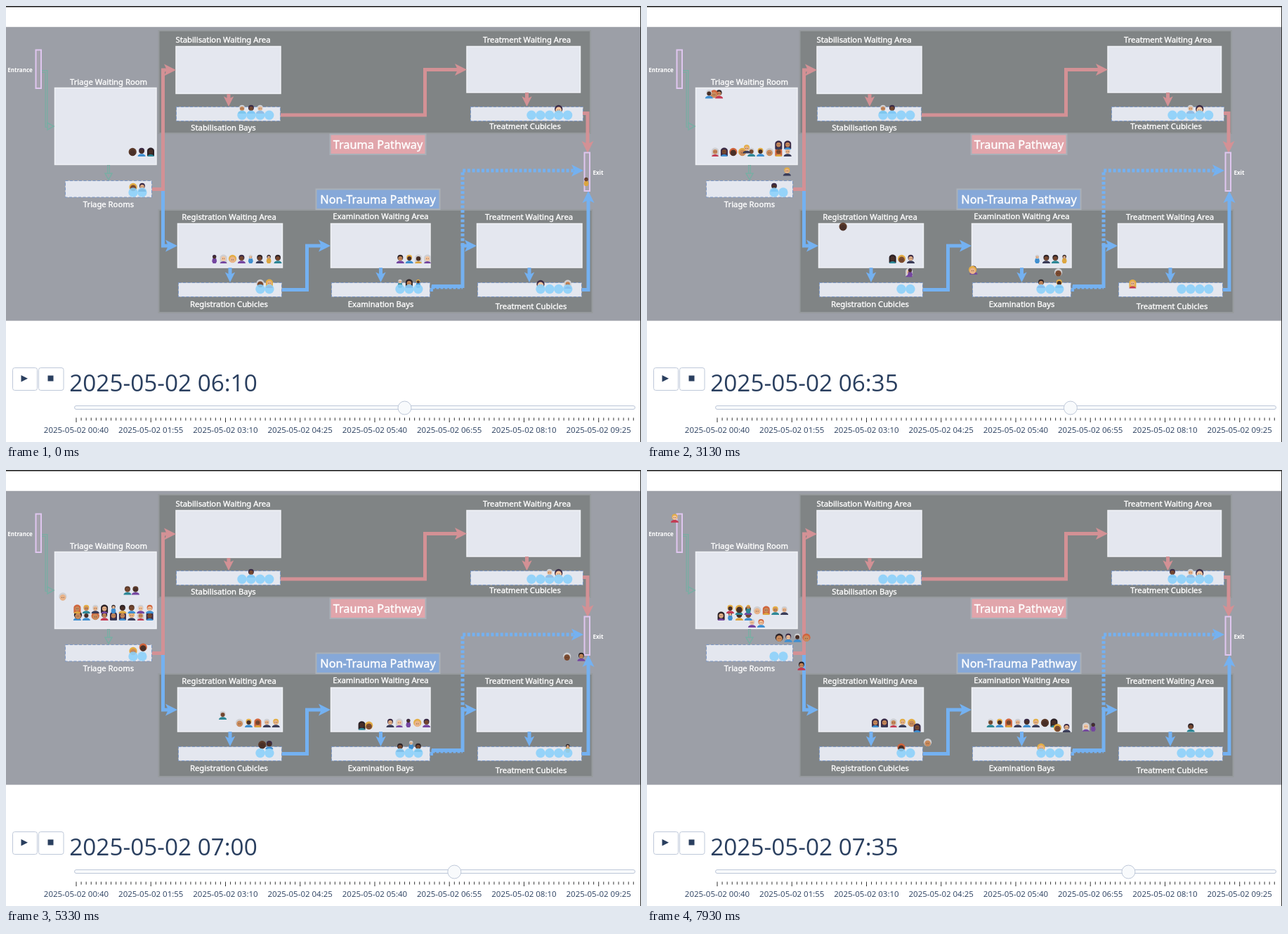
Recreate the animation shown at these times as an HTML page. Size 904 by 620 pixels, loop 8 s.

```html
<!DOCTYPE html>
<html lang="en">
<head>
<meta charset="utf-8">
<title>Patient pathway simulation</title>
<style>
  html, body { margin: 0; width: 100%; height: 100%; overflow: hidden; background: #fff; }
  svg { display: block; width: 904px; height: 620px; }
  .label { font: 11.25px "Noto Sans", sans-serif; fill: #fff; stroke: #fff; stroke-width: .35; text-anchor: middle; }
  .pathway { font-size: 16.3px; }
  .door { font-size: 8px; font-weight: 700; stroke: none; }
  .clock { font: 33.3px "Open Sans", "Noto Sans", sans-serif; fill: #2a3f5f; }
  .tick { font: 11.5px "Open Sans", "Noto Sans", sans-serif; fill: #2a3f5f; text-anchor: middle; }
</style>
</head>
<body>
<svg id="stage" viewBox="0 0 904 620">
  <g id="scene"></g>
  <g id="people"></g>
  <g id="resources"></g>
  <g id="controls"></g>
  <g id="toolbar" opacity="0">
    <rect x="787" y="29" width="115" height="24" fill="#fff" opacity=".5"/>
    <path d="M799 33h3l2-3h4l2 3h4v11h-15z" fill="#8f9297"/>
    <circle cx="806" cy="38.500" r="3.200" fill="#c9cbcf"/>
    <circle cx="806" cy="38.500" r="1.600" fill="#8f9297"/>
    <rect x="830" y="31" width="13" height="13" fill="none" stroke="#8f9297" stroke-width="2" stroke-dasharray="2 1.700"/>
    <path d="M856 41c-6-3-3-10 4-10s8 6 3 8-6-1-7 1 2 2 0 4" fill="none" stroke="#8f9297" stroke-width="1.500"/>
    <rect x="883" y="30" width="15" height="15" rx="2" fill="#111"/>
  </g>
</svg>
<script>
const LOOP = 8000, FRAME = 1000 / 15;
const PLAY_AT = 1258, STEP = 412, KNOB_MOVE = 150;
const GAP = 12.9, ROW = 10;
const RED = '#d39195', BLUE = '#74b1f1', GREEN = '#78aea4', GREY = '#9c9fa7', INK = '#2a3f5f';
const $ = id => document.getElementById(id);

// ---- drawing helpers ----
const rect = (x1, y1, x2, y2, attrs) =>
  `<rect x="${x1}" y="${y1}" width="${x2 - x1}" height="${y2 - y1}" ${attrs}/>`;
const panel = (...box) => rect(...box, 'fill="#808485" stroke="#969a9d" stroke-width="2"');
const room = (...box) => rect(...box, 'fill="#e4e7ef" stroke="#eff1f5" stroke-width="1.5"');
const bay = (...box) => rect(...box, 'fill="#e4e7ef" stroke="#7c98c6" stroke-dasharray="4 2.500"');
const door = (...box) => rect(...box, 'fill="#a6a3ae" stroke="#dfc6ef" stroke-width="2"');
const sign = (fill, ...box) => rect(...box, `fill="${fill}" stroke="#a9b0b8" stroke-width="2"`);
const label = (text, x, y, kind = '') => `<text class="label ${kind}" x="${x}" y="${y}">${text}</text>`;

function arrow(color, points, { dash = '', size = 1, hollow = false } = {}) {
  const [[px, py], [x, y]] = points.slice(-2);
  const angle = Math.atan2(y - py, x - px);
  const reach = (hollow ? 10 : 12) * size;
  const end = [x - reach * Math.cos(angle), y - reach * Math.sin(angle)];
  const line = (stroke, width) => `<polyline points="${[...points.slice(0, -1), end].join(' ')}" fill="none"
    stroke="${stroke}" stroke-width="${width}" stroke-dasharray="${dash}"/>`;
  const at = `transform="translate(${x} ${y}) rotate(${angle * 180 / Math.PI}) scale(${size})"`;
  return hollow
    ? line(color, 4) + line(GREY, 1.4) +
      `<path d="M-1 0L-10 5V-5z" ${at} fill="${GREY}" stroke="${color}" stroke-width="1.5"/>`
    : line(color, 5) + `<path d="M0 0L-17 8.500L-13 0L-17-8.500z" ${at} fill="${color}"/>`;
}
const down = (color, x, y1, y2) => arrow(color, [[x, y1], [x, y2]], { size: .85 });

$('scene').innerHTML = [
  rect(0, 0, 904, 620, 'fill="#fff"'),
  rect(0, 29.8, 903, 447.6, `fill="${GREY}"`),
  panel(217.5, 35, 832, 181), panel(217.5, 290, 834.5, 436),
  room(69.5, 116.5, 214, 225.5), room(242, 57.5, 391, 124.5), room(656, 57.5, 817.5, 123),
  room(244.5, 309.5, 393.5, 372), room(462.5, 309.5, 604, 372), room(670.5, 309.5, 820, 372),
  bay(84.5, 248.5, 207.5, 272), bay(242.5, 143.5, 390.5, 163.5), bay(661.5, 143.5, 821.5, 163.5),
  bay(245.5, 393.5, 392.5, 413.5), bay(463.5, 393.5, 603.5, 413.5), bay(671.5, 393.5, 819.5, 413.5),
  arrow(GREEN, [[50, 93], [57.5, 93], [57.5, 171], [69, 171]], { hollow: true }),
  arrow(GREEN, [[146, 226], [146, 248]], { hollow: true }),
  arrow(BLUE, [[223.5, 262], [223.5, 341], [244, 341]]),
  arrow(RED, [[208, 260.5], [223.5, 260.5], [223.5, 91], [242, 91]]),
  arrow(RED, [[391, 155], [596.5, 155], [596.5, 90.5], [656, 90.5]]),
  arrow(RED, [[821, 152.5], [828, 152.5], [828, 209]]),
  down(RED, 317, 125, 143), down(RED, 741.5, 123, 143),
  arrow(BLUE, [[393, 403.5], [428.5, 403.5], [428.5, 341], [462, 341]]),
  arrow(BLUE, [[650, 341], [650, 234], [822, 234]], { dash: '4 2.700' }),
  `<path d="M604 403.500H608V400H650" fill="none" stroke="${BLUE}" stroke-width="5" stroke-dasharray="4 2"/>`,
  arrow(BLUE, [[606, 398.5], [650, 398.5], [650, 341], [670, 341]]),
  arrow(BLUE, [[820, 403.5], [829, 403.5], [829, 263]]),
  down(BLUE, 319, 372, 393), down(BLUE, 533.5, 372, 393), down(BLUE, 745, 372, 393),
  door(42.5, 62.5, 50, 117), door(823.5, 208.5, 831, 263),
  sign('#e1a5ab', 461.5, 182.5, 597.5, 211), sign('#86a8d8', 441.5, 260.5, 617.5, 289),
  label('Trauma Pathway', 529.5, 203, 'pathway'), label('Non-Trauma Pathway', 529.5, 281, 'pathway'),
  label('Entrance', 20, 94, 'door'), label('Exit', 843, 239.5, 'door'),
  label('Triage Waiting Room', 146, 112), label('Triage Rooms', 146, 286),
  label('Stabilisation Waiting Area', 309, 52), label('Stabilisation Bays', 309.5, 177),
  label('Treatment Waiting Area', 741.5, 52), label('Treatment Cubicles', 739, 175),
  label('Registration Waiting Area', 317.5, 303.5), label('Registration Cubicles', 317.5, 428),
  label('Examination Waiting Area', 533.5, 303), label('Examination Bays', 533.5, 428),
  label('Treatment Waiting Area', 744.5, 303.5), label('Treatment Cubicles', 747.5, 430.5),
].join('');

// ---- places: queues fill leftwards in rows of ten, bays have numbered slots ----
const ENTRANCE = [7, 36], EXIT = [826, 250];
const QUEUES = { W: [206, 208], R: [387, 360], E: [600, 360] };
const BAYS = {
  T: { x: 181, y: 258, count: 2, circle: 265 },
  s: { x: 336, y: 147, count: 4, circle: 155.3 },
  u: { x: 748, y: 147, count: 5, circle: 155.3 },
  r: { x: 362, y: 395, count: 2, circle: 402.5 },
  e: { x: 561, y: 395, count: 3, circle: 402.5 },
  N: { x: 761, y: 396, count: 4, circle: 402.5 },
};

function position(key, index) {
  if (key === 'X') return EXIT;
  const queue = QUEUES[key];
  if (queue) return [queue[0] - GAP * (index % 10), queue[1] - ROW * Math.floor(index / 10)];
  const spot = BAYS[key[0]];
  return [spot.x + GAP * key[1], spot.y];
}

$('resources').innerHTML = Object.values(BAYS).flatMap(b => Array.from({ length: b.count }, (_, i) =>
  `<circle cx="${b.x + GAP * i}" cy="${b.circle}" r="6.700" fill="#8ad0fb" opacity=".88"/>`)).join('');

// Moves per five minutes. A: arrival, X: exit, *n repeats.
const SCHEDULE = [
  'A>W*3 A>T0 A>T1 A>s0 A>s1 A>s2 A>u3 A>R*8 A>r0 A>r1 A>E*4 A>e0 A>e1 A>e2 A>N0 A>N3 A>X',
  's2>u2 N0>X e2>X E>e2 r1>E r0>E R>r1 R>r0 A>W*5',
  'e0>X E>e0 r0>E R>r0 T1>R W>T1 A>W*3',
  'N3>X e2>X E>e2 r1>E R>r1 T0>R W>T0 A>W*2',
  'e0>X e1>X E>e0 E>e1 r0>E r1>E R>r0 R>r1 T1>R W>T1 A>W*3',
  'e1>N2 E>e1 r0>E r1>E R>r0 R>r1 T1>R W>T1 A>W*3',
  'e0>N0 E>e0 r1>E R>r1 T0>R W>T0 A>W*3',
  'N2>X e2>X E>e2 r0>E R>r0 T1>R W>T1 s0>u1 A>W*3',
  'r1>E R>r1 T0>R W>T0 A>W*4',
  'u1>X e0>N3 E>e0 T1>R W>R T0>R W>T1 W>T0 A>W',
  'N0>X e1>X E>e1 r0>E r1>E R>r0 R>r1 T1>R W>T1 A>W*3',
  'N3>X r0>E R>r0 A>W*2',
  'e0>N1 e1>N3 E>e1 E>e0 r0>E r1>E R>r0 R>r1 T1>R W>R T0>R W>T1 W>T0',
  'r0>E R>r0 T0>R W>T0',
  'N3>X e1>X e2>N0 E>e2 E>e1 r1>E R>r1 T1>R W>T1 A>W',
  'N1>X r0>E R>r0 T1>R W>T1 s1>u0',
  'r0>E R>r0 T0>R',
  'N0>X e1>X e2>X E>e2 E>e1 r1>E R>r1 T1>R W>R*4 W>T1 W>T0 A>W',
];

let population = 0;
const places = {};
const snapshots = SCHEDULE.map(moves => {
  places.X = [];
  for (const move of moves.split(' ')) {
    const [, from, to, times = 1] = move.match(/(\w+)>(\w+)\*?(\d+)?/);
    for (let i = 0; i < times; i++) {
      const id = from === 'A' ? population++ : places[from].shift();
      (places[to] ??= []).push(id);
    }
  }
  const spots = {};
  for (const key in places) places[key].forEach((id, i) => { spots[id] = position(key, i); });
  return spots;
});

// ---- people ----
const SKIN = ['#f5c59d', '#c98a5b', '#7a4a30', '#e9b48a', '#4a3028'];
const HAIR = ['#2c2226', '#5b3a2a', '#e3ad45', '#cfcfd2', '#3a2a45', '#d0643c'];
const CLOTHES = ['#3a3c58', '#3f8fd0', '#7446a0', '#2d8796', '#c43a52', '#dca640'];

function person(id) {
  const pick = (list, salt) => {
    const n = Math.sin((id + 1) * salt) * 4375.85;
    return list[Math.floor((n - Math.floor(n)) * list.length)];
  };
  const skin = pick(SKIN, 12.98), hair = pick(HAIR, 78.23), clothes = pick(CLOTHES, 37.71);
  const face = (cy, r) => `<circle cy="${cy}" r="${r}" fill="${skin}"/>
    <path d="M-1.600 ${cy}h.8M.8 ${cy}h.8" stroke="#33262a" stroke-width=".9"/>`;
  const kind = pick(['bust', 'head', 'bust', 'long', 'figure'], 51.37);
  const body = {
    head: `<circle cy="-.6" r="5.600" fill="${hair}"/>${face(.9, 4.3)}`,
    bust: `<path d="M-5.500 6C-5.500 1 5.500 1 5.500 6z" fill="${clothes}"/>
      <circle cy="-2.200" r="4" fill="${hair}"/>${face(-1, 3)}`,
    long: `<path d="M-5 5V-2C-5-8 5-8 5-2V5z" fill="${hair}"/>
      <path d="M-5 6C-4 2 4 2 5 6z" fill="${clothes}"/>${face(-.8, 3.2)}`,
    figure: `<path d="M-2.500-1h5l1 4-1.500 3h-4l-1.500-3z" fill="${clothes}"/>
      <circle cy="-3.500" r="2.700" fill="${hair}"/>${face(-2.8, 2)}`,
  }[kind];
  return `<g>${body}</g>`;
}
$('people').innerHTML = Array.from({ length: population }, (_, id) => person(id)).join('');
const figures = [...$('people').children];

// ---- player controls ----
const TICK = 7.083, sliderX = minutes => 100 + (minutes - 40) / 5 * TICK;
const stamp = minutes => '2025-05-02 ' +
  [Math.floor(minutes / 60), minutes % 60].map(n => String(n).padStart(2, '0')).join(':');
const line = 'stroke="#bec8d9" stroke-width="1"';
const ticks = Array.from({ length: 113 }, (_, i) => {
  const x = 100 + i * TICK, major = i % 15 === 0;
  return `<path d="M${x} 585.500V${major ? 592 : 589.5}" stroke="#333" stroke-width="1"/>` +
    (major ? `<text class="tick" x="${x}" y="607">${stamp(40 + i * 5)}</text>` : '');
});
$('controls').innerHTML = [
  rect(9.5, 514.5, 44.5, 546.5, `rx="3" fill="#fff" ${line}`),
  rect(46.5, 514.5, 82, 546.5, `rx="3" fill="#fff" ${line}`),
  `<path d="M21.500 525L31 529.700L21.500 534.500z" fill="${INK}"/>`,
  rect(59.5, 525.5, 67.5, 533.5, `fill="${INK}"`),
  '<text class="clock" id="clock" x="90.300" y="548"></text>',
  rect(97.5, 568.5, 895.5, 573.5, `rx="2.500" fill="#f8fafc" ${line}`),
  ...ticks,
  `<circle id="knob" cy="571.500" r="9.500" fill="#f8fafc" ${line}/>`,
  rect(0, 0, 904, 1.6, 'fill="#222"'), rect(903, 0, 904, 620, 'fill="#333"'),
].join('');

// ---- playback ----
const clamp = v => Math.min(1, Math.max(0, v));
const cubicInOut = v => v < .5 ? 4 * v ** 3 : 1 - 4 * (1 - v) ** 3;
const mix = (a, b, v) => a + (b - a) * v;

function draw(t) {
  const step = Math.min(SCHEDULE.length - 1, Math.max(0, Math.floor((t - PLAY_AT) / STEP) + 1));
  const elapsed = step ? t - PLAY_AT - (step - 1) * STEP : STEP;
  const progress = clamp(elapsed / STEP);
  const now = snapshots[step], before = snapshots[step - 1] ?? now;
  figures.forEach((figure, id) => {
    const to = now[id], from = before[id] ?? ENTRANCE;
    figure.style.display = to ? '' : 'none';
    if (to) figure.setAttribute('transform',
      `translate(${mix(from[0], to[0], progress)} ${mix(from[1], to[1], progress)})`);
  });
  const minutes = 370 + step * 5;
  const lag = step ? 5 * (1 - cubicInOut(clamp(elapsed / KNOB_MOVE))) : 0;
  $('clock').textContent = stamp(minutes);
  $('knob').setAttribute('cx', sliderX(minutes - lag));
  $('toolbar').setAttribute('opacity', clamp((t - 620) / 350) * clamp((2050 - t) / 300));
}

const start = performance.now();
function tick() {
  const t = (performance.now() - start) % LOOP;
  draw(Math.floor((t + 5) / FRAME) * FRAME);
  requestAnimationFrame(tick);
}
tick();
</script>
</body>
</html>
```
